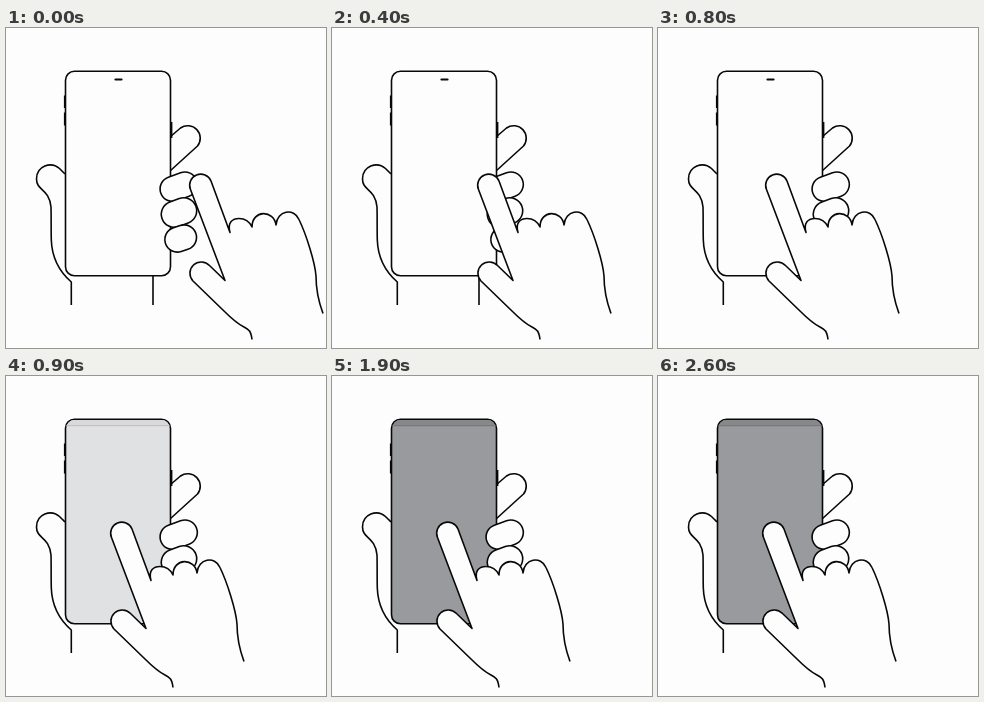
These frames come from a looping animation (320x320 px, 3800 ms). An HTML page:

```html
<!DOCTYPE html>
<html lang="en">
<head>
<meta charset="utf-8">
<title>Tap on a phone</title>
<style>
  html, body { margin: 0; height: 100%; overflow: hidden; background: #fefdfe; }
  svg { display: block; width: 100vw; height: 100vh; }
  .line { fill: #fefdfe; stroke: #080808; stroke-width: 1.6; stroke-linejoin: round; }
  .detail { stroke: #080808; stroke-width: 2.2; }
</style>
</head>
<body>
<svg viewBox="0 0 320 320">
  <!-- holding hand, behind the phone -->
  <g class="line">
    <path d="M59 146 L53.5 140.5 C45 133 30.5 138 30.5 151 C30.500 163 43 160 45 179 C45.300 190 45 200 45.300 212 C46 233 55 245 65.300 254 V277 M147 247 V277" />
    <path d="M164 109 L174.500 100 A12.500 12.500 0 0 1 191.500 118 L164 143" />
  </g>
  <path class="detail" d="M59 67.500 V80 M59 84.500 V97.500 M165.300 94 V110" />
  <rect id="screen" class="line" x="59.500" y="43.200" width="105" height="204.500" rx="9" />
  <path id="notch" class="detail" d="M109.500 51.500 H115.500" stroke-linecap="round" />
  <g id="statusBar">
    <path id="strip" d="M60.300 49.500 V52 A8 8 0 0 1 68.500 44 H155.500 A8 8 0 0 1 163.700 52 V49.500 Z" />
    <path id="divider" d="M60.500 49.700 H163.500" />
  </g>
  <!-- gripping fingers and pointing hand, in front -->
  <g class="line">
    <rect x="-19" y="-12.500" width="38" height="25" rx="12.500" transform="translate(172.700 158.700) rotate(-20)" />
    <rect x="-18" y="-13" width="36" height="26" rx="13" transform="translate(173 184.500) rotate(-20)" />
    <rect x="-16" y="-12.500" width="32" height="25" rx="12.500" transform="translate(174.700 210.500) rotate(-18)" />
    <path id="hand" d="M246 311.500 C245 303 243 301.500 238 299 C230 295 224 289 218 283
      L187 253 A11 11 0 0 1 203.500 237.500 L219 252.500
      L184.500 161.500 A11 11 0 0 1 205 153 L224 204.500
      C221 194 227 190.500 233 190.500 Q242 190.500 246 199
      C246 181.500 268 181.500 270 197
      C271 182.500 288 179.500 293 191.500
      C300 206 309 234 310 248 C310 262 312 272 317 285.500" />
  </g>
</svg>
<script>
  const LOOP = 3800, STEP = 100;
  const handShift = [0, -4, -12, -24, -38, -54, -66.5, -72.5, -76, -79];
  const tones = [
    { from: 1900, screen: '#989a9d', strip: '#87888a', divider: '#777274' },
    { from: 900, screen: '#dfe1e3', strip: '#d9d9db', divider: '#c6babd' },
    { from: 0, screen: '#fefdfe' }
  ];
  const el = id => document.getElementById(id);

  function draw(now) {
    const time = now % LOOP;
    const step = Math.min(Math.floor(time / STEP), handShift.length - 1);
    el('hand').setAttribute('transform', `translate(${handShift[step]} 0)`);

    const tone = tones.find(t => time >= t.from);
    const lit = Boolean(tone.strip);
    el('screen').style.fill = tone.screen;
    el('notch').style.display = lit ? 'none' : '';
    el('statusBar').style.display = lit ? '' : 'none';
    if (lit) {
      el('strip').style.fill = tone.strip;
      el('divider').style.stroke = tone.divider;
    }
  }

  const start = performance.now();
  function tick() {
    draw(performance.now() - start);
    requestAnimationFrame(tick);
  }
  tick();
</script>
</body>
</html>
```
